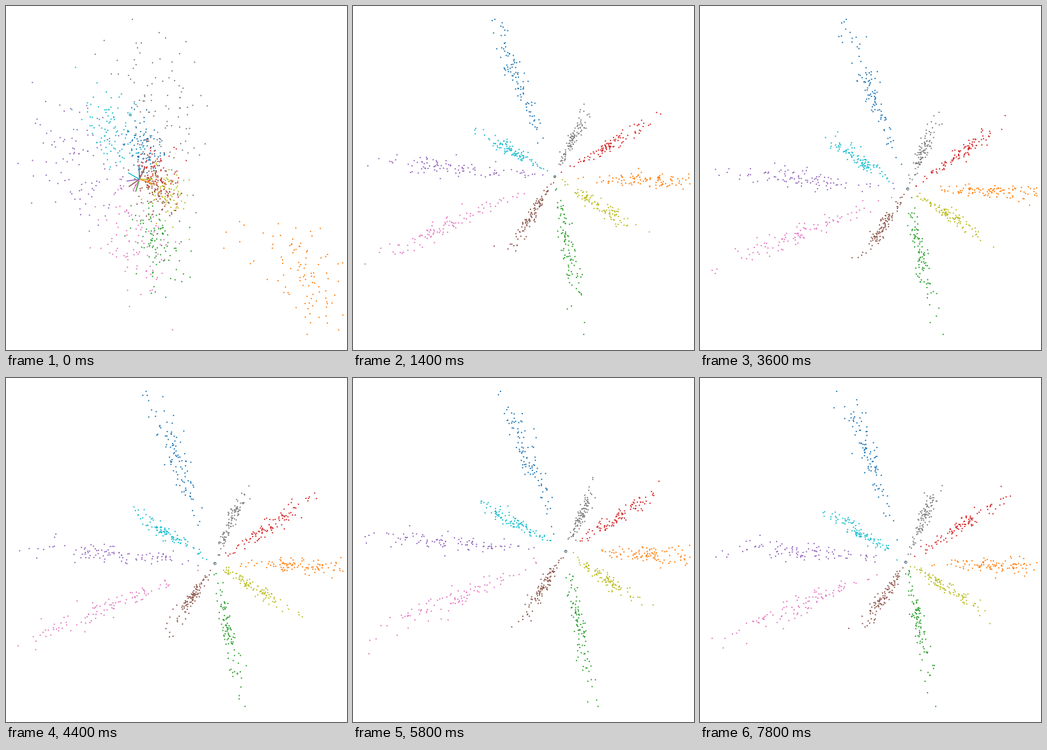
Write a matplotlib script that moves like this. It is 534x540 px and loops after 8 s.

```python
import numpy as np
import matplotlib.pyplot as plt
from matplotlib.animation import FuncAnimation
from matplotlib.collections import LineCollection

W, H, DPI = 534, 540, 100
FRAMES, STEP = 40, 200
PER_CLASS = 96
MERGE = 7  # frame at which the cloud has become a star
LO, HI = np.array([19, 21]), np.array([527.5, 515.5])
COLORS = np.array(plt.get_cmap("tab10").colors)

# Star: angle of each ray in degrees, its length, where its dots gather
RAYS = [(110, 278, .62), (-2, 203, .67), (-79, 240, .45), (33, 190, .52),
        (175, 297, .55), (-122, 139, .46), (-156.5, 328, .55),
        (67, 128, .52), (-33, 164, .47), (148, 149, .58)]
# First scatter: center x, center y and spread of each class
CLOUD = [(216, 212, 15), (483, 423, 26), (241, 382, 21), (243, 264, 17),
         (120, 242, 33), (236, 282, 17), (207, 385, 27), (244, 150, 39),
         (253, 294, 15), (166, 190, 21)]

START = np.array([209, 272])
START_ANGLES = np.radians([92, -18, -107, 66, 188, 215, 240, 64, 0, 150])
HUB_FRAMES = [7, 11, 18, 22, 29, 39]
HUB_X = [316, 322, 325, 327, 333, 322]
HUB_Y = [268, 269, 287, 291, 272, 289]


def unit(angle):
    """Direction on the screen, where y points down."""
    return np.stack([np.cos(angle), -np.sin(angle)], axis=-1)


def cloud_offsets(rng, x, y, spread):
    a, b = np.clip(rng.normal(size=(2, PER_CLASS)), -2.5, 2.5)
    dots = np.column_stack([x + spread * a,
                            y + 1.6 * spread * (.3 * a + .95 * b)]) - START
    # a few strays lie on the way to the middle
    pull = rng.uniform(.1, .7, PER_CLASS) * (rng.random(PER_CLASS) < .15)
    return dots * (1 - pull)[:, None]


def ray_offsets(rng, angle, length, mid):
    t = rng.normal(mid, .2, PER_CLASS)
    t = np.where((t < .06) | (t > 1), rng.uniform(.15, .9, PER_CLASS), t)
    t[0] = 1
    width = 3 + .016 * length
    side = rng.normal(0, width, PER_CLASS) * (.35 + t)
    angle = np.radians(angle)
    return (np.outer(t * length, unit(angle))
            + np.outer(side, unit(angle + np.pi / 2)))


def fill_view(offsets, hub):
    """Scale each side of the hub so that the dots reach the edges."""
    before = (LO - hub) / offsets.min(0)
    after = (HI - hub) / offsets.max(0)
    return hub + offsets * np.where(offsets < 0, before, after)


def scene(i):
    rng = np.random.default_rng(100 + i)
    mix = 1 - (1 - min(i / MERGE, 1)) ** 2.5
    hub = np.array([np.interp(i, HUB_FRAMES, HUB_X),
                    np.interp(i, HUB_FRAMES, HUB_Y)])
    center = (1 - mix) * START + mix * hub
    offsets = np.concatenate([
        (1 - mix) * cloud_offsets(rng, *cloud) + mix * ray_offsets(rng, *ray)
        for cloud, ray in zip(CLOUD, RAYS)])

    aim = unit(np.radians([ray[0] for ray in RAYS]))
    size = 20.5 * (1 - mix) + 2.2 * mix
    ends = center + size * ((1 - mix) * unit(START_ANGLES) + mix * aim)
    return fill_view(offsets, center), center, ends


fig = plt.figure(figsize=(W / DPI, H / DPI), dpi=DPI, facecolor="white")
ax = fig.add_axes([0, 0, 1, 1])
ax.set(xlim=(0, W), ylim=(H, 0))
ax.axis("off")

labels = np.repeat(np.arange(10), PER_CLASS)
order = np.random.default_rng(5).permutation(len(labels))
points = ax.scatter(np.zeros(len(labels)), np.zeros(len(labels)), s=2.4,
                    c=COLORS[labels[order]], linewidths=0)
spokes = LineCollection([], colors=COLORS, linewidths=1.1, zorder=3)
ax.add_collection(spokes)
ring, = ax.plot([], [], "o", ms=2.2, mfc="white", mec="#5f7478", mew=.7,
                zorder=4)


def update(i):
    dots, center, ends = scene(i)
    points.set_offsets(dots[order])
    spokes.set_segments([[center, end] for end in ends])
    ring.set_data([center[0]], [center[1]])
    ring.set_visible(i > MERGE)
    return points, spokes, ring


anim = FuncAnimation(fig, update, frames=FRAMES, interval=STEP, repeat=True,
                     repeat_delay=0, blit=False)
plt.show()
```
